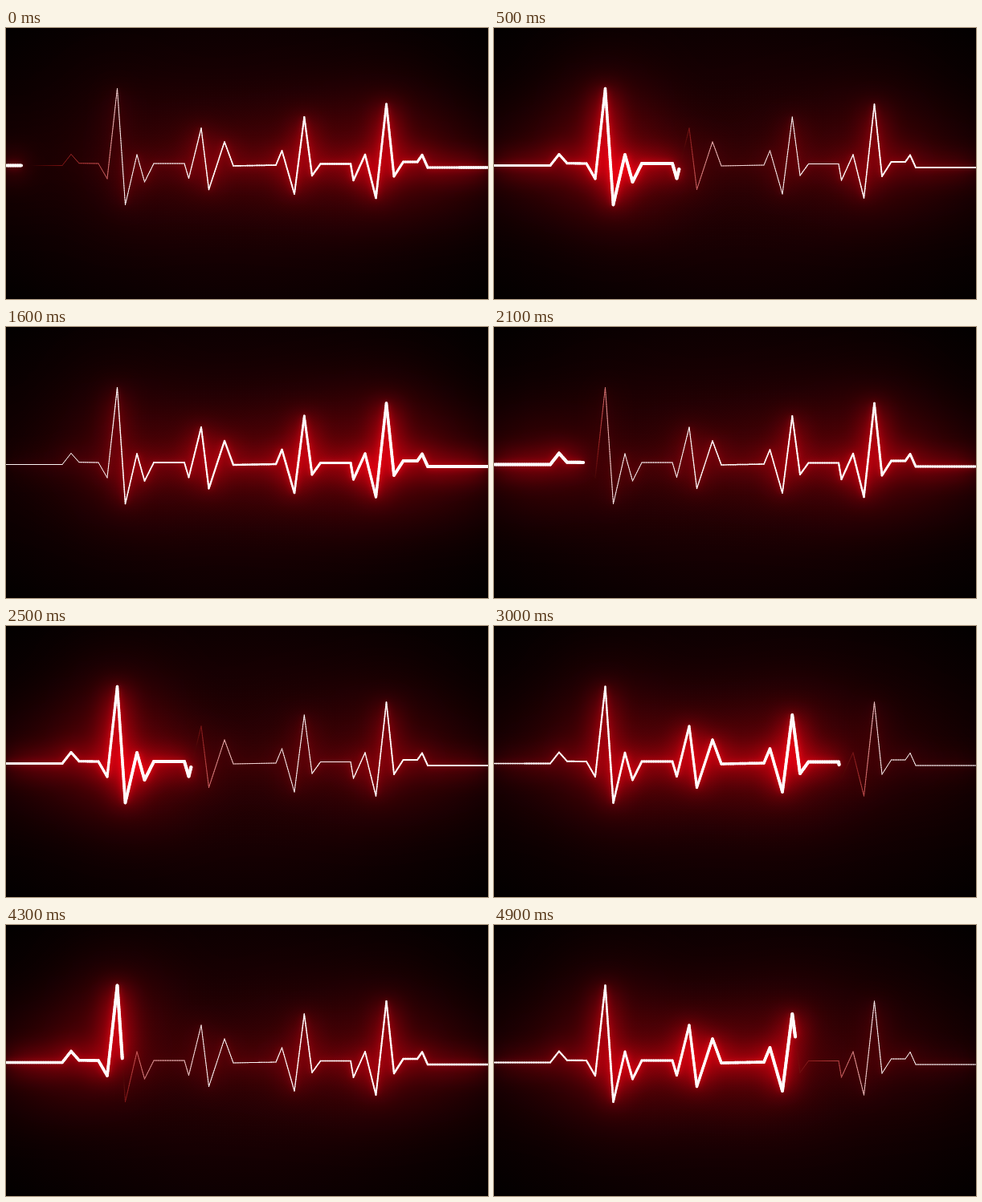
Animation, 600 px wide and 338 px high, one loop 5 s. Source, as an HTML page with a canvas:

```html
<!DOCTYPE html>
<html lang="en">
<head>
<meta charset="utf-8">
<title>Heartbeat line</title>
<style>
html, body { margin: 0; width: 100%; height: 100%; overflow: hidden; background: #050001; }
canvas { display: block; width: 100vw; height: 100vh; }
</style>
</head>
<body>
<canvas id="stage" width="600" height="338"></canvas>
<script>
const W = 600, H = 338;
const LOOP = 5000, STEP = 100, BEAT = 2000;
const TRACK = 2000;     // path length including the hidden return
const THICK = 4.1;

// Corners of the pulse line
const points = [
  [0, 171.5], [70, 171.5], [81, 157.5], [91, 168.7], [115, 169], [126, 188],
  [138.5, 75.5], [148.5, 220.5], [163, 158], [172.5, 192], [184, 169], [222, 169],
  [227.5, 187.5], [243, 125], [252.5, 201.5], [272, 142], [283, 172], [336, 171],
  [343.5, 153], [359, 207], [371.3, 111], [381, 184], [391.5, 169.5], [429, 169.5],
  [432.5, 190], [447, 158], [460.5, 212], [473.5, 95], [483, 185], [494.5, 167],
  [512, 167], [518, 158.5], [525, 174], [W, 174]
];

const mix = (a, b, k) => a + (b - a) * k;

function makeLayer() {
  const c = document.createElement('canvas');
  c.width = W;
  c.height = H;
  return c.getContext('2d');
}

// Cut the path into short pieces so that the width can taper
function cutPath() {
  const pieces = [];
  let dist = 0;
  for (let i = 1; i < points.length; i++) {
    const [x0, y0] = points[i - 1], [x1, y1] = points[i];
    const len = Math.hypot(x1 - x0, y1 - y0), n = Math.ceil(len / 3);
    for (let j = 0; j < n; j++) {
      const a = j / n, b = (j + 1) / n;
      pieces.push({
        s: dist + len * a, len: len / n,
        x0: mix(x0, x1, a), y0: mix(y0, y1, a),
        x1: mix(x0, x1, b), y1: mix(y0, y1, b)
      });
    }
    dist += len;
  }
  return pieces;
}

const pieces = cutPath();
const stage = document.getElementById('stage').getContext('2d');
const glow = makeLayer();
const backdrop = makeLayer();

function paintBackdrop() {
  const c = backdrop;
  c.translate(W / 2, H / 2);
  c.scale(W / H, 1);
  const g = c.createRadialGradient(0, 0, 0, 0, 0, 235);
  g.addColorStop(0, 'rgb(32,1,3)');
  g.addColorStop(0.5, 'rgb(21,0,2)');
  g.addColorStop(1, 'rgb(3,0,0)');
  c.fillStyle = g;
  c.fillRect(-H / 2, -H / 2, H, H);
}

// Slow at both ends of a beat, fastest in between
function headAt(t) {
  const u = t / BEAT;
  return 19 + TRACK * u + 165 * Math.sin(Math.PI * u) ** 2;
}

// Dying trail goes from white through pink to dark red
function coreColor(left) {
  const red = 255 * (1 - Math.exp(-left / 80));
  const rest = 250 * (1 - Math.exp(-((left / 180) ** 2)));
  return `rgb(${Math.round(red)},${Math.round(rest)},${Math.round(rest)})`;
}

function trace(c, head, style) {
  for (const p of pieces) {
    const k = head > p.s && head < p.s + p.len ? (head - p.s) / p.len : 1;
    const behind = ((head - p.s) % TRACK + TRACK) % TRACK;
    style(c, TRACK - behind);
    c.beginPath();
    c.moveTo(p.x0, p.y0);
    c.lineTo(mix(p.x0, p.x1, k), mix(p.y0, p.y1, k));
    c.stroke();
  }
}

function addGlow(head, scale, blur, color) {
  glow.clearRect(0, 0, W, H);
  glow.strokeStyle = color;
  trace(glow, head, (c, left) => { c.lineWidth = THICK * scale * left / TRACK; });
  stage.filter = `blur(${blur}px)`;
  stage.drawImage(glow.canvas, 0, 0);
  stage.filter = 'none';
}

function draw(time) {
  const t = Math.floor(time % LOOP / STEP) * STEP;
  const head = headAt(t % BEAT);

  stage.globalCompositeOperation = 'source-over';
  stage.drawImage(backdrop.canvas, 0, 0);

  stage.globalCompositeOperation = 'lighter';
  addGlow(head, 11, 45, 'rgb(140,0,8)');
  addGlow(head, 4.5, 15, 'rgb(125,0,10)');
  addGlow(head, 1.6, 4, 'rgb(70,2,8)');

  stage.globalCompositeOperation = 'lighten';
  stage.lineCap = 'round';
  trace(stage, head, (c, left) => {
    c.lineWidth = Math.max(1, THICK * left / TRACK);
    c.strokeStyle = coreColor(left);
  });
}

paintBackdrop();
const start = performance.now();
let shown = -1;
function tick() {
  const time = performance.now() - start;
  const step = Math.floor(time / STEP);
  if (step !== shown) {
    shown = step;
    draw(time);
  }
  requestAnimationFrame(tick);
}
tick();
</script>
</body>
</html>
```
